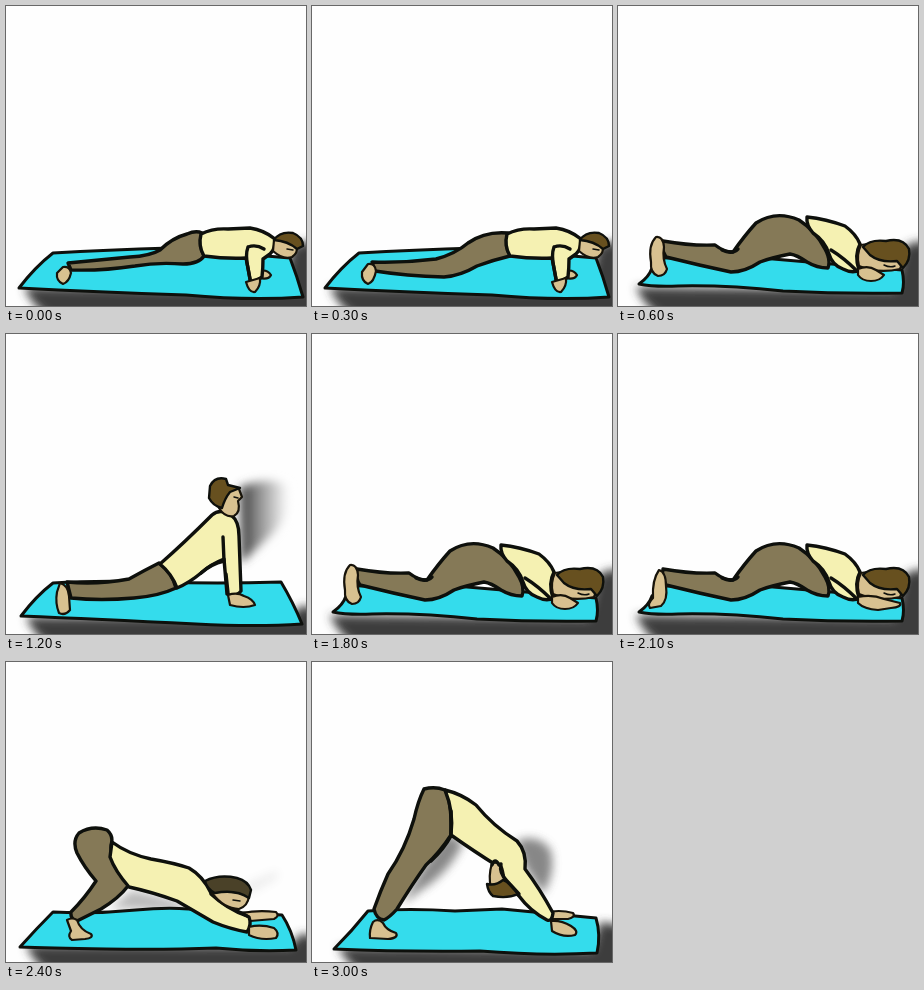
These frames come from a looping animation (300x300 px, 3.6 s). An HTML page without scripts:

```html
<!DOCTYPE html>
<html lang="en">
<head>
<meta charset="utf-8">
<title>Yoga flow</title>
<style>
html, body { margin: 0; width: 100%; height: 100%; overflow: hidden; background: #fefefe; }
svg { display: block; width: 100%; height: 100%; }
path { stroke: #0e100c; stroke-width: 3.4; stroke-linejoin: round; stroke-linecap: round; fill: none; }
.mat { fill: #34dcec; stroke-width: 3; }
.pants { fill: #857957; }
.shirt { fill: #f5f1b2; }
.skin { fill: #d8c190; stroke: #17130a; stroke-width: 2.2; }
.hair { fill: #67501f; stroke-width: 2.4; }
.dark { fill: #4a4128; }
.thin { stroke-width: 1.5; }
.shade { stroke: none; fill: #3c3c3c; filter: url(#soft); }
.pale { fill: #555; opacity: .7; }

/* A pose is held for one or two beats of 300 ms, then cut. */
.pose { visibility: hidden; animation: hold 3600ms step-end infinite; animation-delay: calc(var(--at) * 1ms - 3600ms); }
.brief { animation-name: flash; }
@keyframes hold { 0% { visibility: visible } 16.6667%, 100% { visibility: hidden } }
@keyframes flash { 0% { visibility: visible } 8.3333%, 100% { visibility: hidden } }
</style>
</head>
<body>
<svg viewBox="0 0 300 300">
<defs>
  <filter id="soft" x="-30%" y="-50%" width="160%" height="200%"><feGaussianBlur stdDeviation="5"/></filter>
  <linearGradient id="wall"><stop offset="0" stop-color="#333"/><stop offset=".35" stop-color="#888"/><stop offset="1" stop-color="#fff"/></linearGradient>

  <path id="ground" class="shade" d="M20 283L284 284L294 272L312 274V312H44Q27 300 20 283Z"/>
  <path id="corner" class="shade" d="M18 281L276 284L286 242Q294 234 312 236V312H46Q27 302 18 281Z"/>

  <g id="plankBase">
    <use href="#corner"/>
    <path class="mat" d="M13 282Q29 261 47 247Q100 244 165 242L284 252Q291 270 297 291Q245 295 180 289Q90 286 13 282Z"/>
  </g>
  <g id="plankTop">
    <path class="skin" d="M254 265Q261 263 265 269Q263 274 253 272Z"/>
    <path class="shirt" d="M195 228Q207 222 222 223L244 222Q258 224 269 233Q270 242 264 248L257 253Q257 262 256 271L245 278L240 252Q220 253 198 250Q192 240 195 228Z"/>
    <path d="M242 241Q239 249 242 262L245 279M242 241Q250 238 258 243"/>
    <path class="skin" d="M240 276L254 272Q255 280 249 286Q243 287 240 276Z"/>
    <path class="skin" d="M268 234Q280 231 291 240Q292 247 286 251Q277 254 267 245Z"/>
    <path class="hair" d="M268 234Q274 225 287 227Q297 231 297 240L291 243Q282 235 268 234Z"/>
    <path class="thin" d="M281 243L287 244"/>
  </g>

  <g id="proneBase">
    <use href="#corner"/>
    <path class="mat" d="M21 278Q31 271 34 262L46 252L120 250L284 264Q287 277 284 287Q225 288 165 285Q110 279 60 280Q35 281 21 278Z"/>
  </g>
  <g id="proneLegs">
    <path class="pants" d="M45 235Q73 240 97 239Q106 246 115 246Q127 229 138 217Q158 204 181 214Q198 225 207 243Q213 254 210 262Q199 262 189 256Q179 249 172 248Q152 252 142 256Q127 266 113 266Q80 259 48 251Q43 244 45 235Z"/>
    <path d="M104 244Q114 249 120 243"/>
  </g>
  <path id="proneTorso" class="shirt" d="M189 211Q208 213 227 220Q238 228 242 238Q236 249 241 264Q235 268 225 263Q214 259 211 248Q207 235 195 227Q188 219 189 211Z"/>
  <g id="proneHead">
    <path class="skin" d="M243 239Q238 249 241 260Q260 268 282 263L286 253L262 236Z"/>
    <path class="hair" d="M245 241Q252 233 268 235Q285 231 291 243Q293 254 285 262L279 255Q262 257 252 249Z"/>
    <path class="thin" d="M266 259Q272 262 277 260"/>
  </g>
  <g id="prone">
    <use href="#proneBase"/><use href="#proneLegs"/>
    <path class="skin" d="M38 231Q45 230 46 241Q44 253 49 263Q47 270 40 270Q32 267 33 256Q30 239 38 231Z"/>
    <use href="#proneTorso"/><use href="#proneHead"/>
    <path class="skin" d="M240 263Q250 259 258 264L266 269Q262 275 253 275Q244 275 240 269Z"/>
    <path d="M213 244Q226 252 239 265"/>
  </g>
</defs>

<g class="pose brief" style="--at:0">
  <use href="#plankBase"/>
  <path class="pants" d="M62 257Q93 254 124 251Q144 250 154 244Q166 232 181 228Q190 224 196 227Q192 238 198 250Q193 258 177 258Q151 256 129 260Q96 265 65 264Z"/>
  <path class="skin" d="M57 261Q64 260 65 267Q63 276 57 278Q50 275 51 267Z"/>
  <use href="#plankTop"/>
</g>

<g class="pose brief" style="--at:300">
  <use href="#plankBase"/>
  <path class="pants" d="M60 256Q92 257 124 253Q143 248 156 237Q173 225 196 227Q192 239 198 250Q181 254 165 260Q148 270 132 271Q94 270 63 265Z"/>
  <path class="skin" d="M56 258Q63 257 64 265Q62 276 56 278Q49 275 50 266Z"/>
  <use href="#plankTop"/>
</g>

<use href="#prone" class="pose" style="--at:600"/>

<g class="pose" style="--at:1200">
  <path class="shade" style="fill:url(#wall)" d="M234 153Q262 142 280 151Q289 174 268 198L235 229Z"/>
  <use href="#ground"/>
  <path class="mat" d="M15 282Q30 262 47 249Q90 246 150 248T275 248Q287 268 296 290Q250 293 190 290Q90 285 15 282Z"/>
  <path class="pants" d="M61 248Q91 251 123 245Q139 236 153 229Q166 238 170 254Q153 262 128 264Q95 267 65 264Z"/>
  <path class="shirt" d="M154 230Q178 209 206 181Q214 174 225 181Q233 187 233 202L235 257Q229 264 221 260L218 225Q205 230 195 239Q183 249 171 254Q166 240 154 230Z"/>
  <path d="M217 203L218 227Q205 230 195 239M220 240L222 259"/>
  <path class="skin" d="M54 249Q62 251 63 262L64 276Q59 282 53 279Q49 269 51 258Z"/>
  <path class="skin" d="M222 261Q231 258 238 262Q247 265 249 271Q238 275 224 271Z"/>
  <path class="skin" d="M213 174Q221 164 221 153L233 155L236 163L232 167Q235 178 228 182Q219 184 213 174Z"/>
  <path class="hair" d="M204 152Q209 142 220 145L222 151L234 154L224 158Q219 164 216 174Q207 172 203 164Z"/>
  <path class="thin" d="M228 163L232 164"/>
</g>

<use href="#prone" class="pose brief" style="--at:1800"/>

<g class="pose brief" style="--at:2100">
  <use href="#proneBase"/><use href="#proneLegs"/>
  <path class="skin" d="M41 236Q48 238 48 252Q50 266 43 272L32 274Q29 270 35 264Q34 246 41 236Z"/>
  <use href="#proneTorso"/><use href="#proneHead"/>
  <path class="skin" d="M240 263Q254 260 266 265L282 269Q284 273 273 274L260 276Q246 275 240 269Z"/>
  <path d="M213 244Q226 252 239 265"/>
</g>

<g class="pose" style="--at:2400">
  <path class="shade pale" style="opacity:.1" d="M240 222L271 209V216L243 232Z"/>
  <path class="shade pale" style="opacity:.4" d="M104 246L126 228L168 238L190 250Z"/>
  <use href="#ground"/>
  <path class="mat" d="M14 285Q31 266 47 250Q90 252 130 248T200 249L276 253Q286 268 290 288Q250 290 210 286Q160 288 100 287T14 285Z"/>
  <path class="skin" d="M236 251Q252 248 270 250Q274 254 268 257L244 259Z"/>
  <path class="pants" d="M73 171Q86 163 101 168Q108 174 105 183Q104 198 113 211Q121 217 122 224Q113 236 95 247L71 259Q64 257 65 250Q79 236 90 219Q78 205 71 191Q66 179 73 171Z"/>
  <path class="shirt" d="M106 180Q122 192 145 197Q168 201 183 206Q197 214 205 231Q220 244 243 255Q246 263 241 270Q224 267 207 260Q188 249 171 239Q146 230 123 225Q109 209 104 195Z"/>
  <path d="M205 232Q221 247 241 254"/>
  <path class="skin" d="M206 231Q225 227 243 234Q242 244 233 247Q218 247 206 231Z"/>
  <path class="hair dark" d="M199 219Q213 212 231 216Q242 219 245 228L243 236Q230 227 209 231Q201 227 199 219Z"/>
  <path class="thin" d="M227 238L234 239"/>
  <path class="skin" d="M61 258Q66 255 71 258Q74 268 85 272Q88 276 79 277L66 278Q61 275 65 269Z"/>
  <path class="skin" d="M243 265Q255 262 268 266Q274 271 270 276Q255 279 243 273Z"/>
</g>

<g class="pose" style="--at:3000">
  <path class="shade pale" d="M91 242Q105 210 137 171L151 181Q137 211 109 228Z"/>
  <path class="shade pale" d="M204 179Q225 171 238 187Q245 208 231 232L213 205Z"/>
  <path class="shade" d="M26 285L280 288L288 260L312 264V312H50Q34 300 26 285Z"/>
  <path class="mat" d="M22 287Q40 269 56 249Q98 246 143 249L190 247L284 256Q289 273 285 291Q230 294 168 289Q92 290 22 287Z"/>
  <path class="skin" d="M232 251Q247 247 261 251Q264 255 256 257L240 257Z"/>
  <path class="pants" d="M112 127Q123 124 133 128Q140 140 139 173Q128 190 114 203Q101 221 85 247Q78 255 72 258Q64 257 62 247Q68 230 76 212Q93 188 102 157Q106 139 112 127Z"/>
  <path class="shirt" d="M133 128Q150 132 164 143Q181 164 205 179Q215 190 213 207Q228 227 241 251Q240 260 235 258Q218 249 207 234Q193 222 184 203Q163 190 139 173Q142 150 133 128Z"/>
  <path d="M139 149V174Q132 187 119 199"/>
  <path class="skin" d="M180 201Q189 199 191 209L194 224L179 225Q176 215 180 201Z"/>
  <path class="hair" d="M175 222Q184 224 191 218Q198 220 206 232Q195 237 181 234Q176 230 175 222Z"/>
  <path d="M189 202Q187 211 195 219L207 232M180 203Q183 195 187 203"/>
  <path class="skin" d="M61 260Q66 256 71 261Q74 268 84 271Q87 276 76 277L58 276Q57 268 61 260Z"/>
  <path class="skin" d="M239 259Q249 258 259 264Q267 269 263 273Q251 276 240 269Z"/>
</g>
</svg>
</body>
</html>
```
